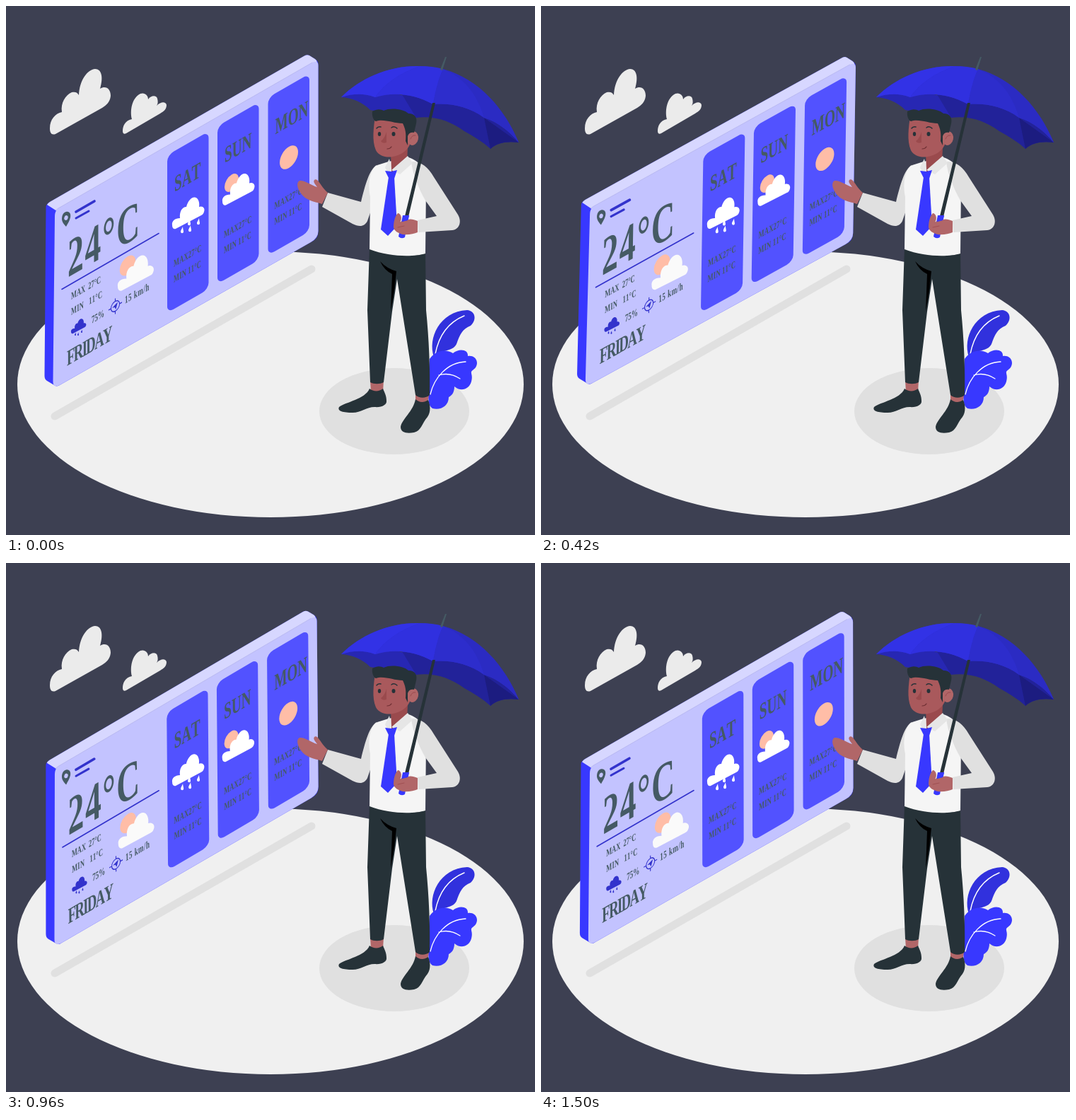
These frames come from a looping animation (748x748 px, 1.54 s). An HTML page with a canvas:

```html
<!DOCTYPE html>
<html lang="en">
<head>
<meta charset="utf-8">
<title>Weather panel</title>
<style>
  html, body { margin: 0; width: 100%; height: 100%; overflow: hidden; background: #3d4052; }
  canvas { display: block; width: 100vw; height: 100vh; }
</style>
</head>
<body>
<canvas id="stage" width="748" height="748"></canvas>
<script>
const ctx = document.getElementById('stage').getContext('2d');
const LOOP = 1540;
const SLOPE = -0.577;
const BLUE = '#3838ff', DEEP = '#3333cc', SLATE = '#455a64', DARK = '#263238';
const SKIN = '#b16668', SKIN_DARK = '#9a4a4d', PEACH = '#ffbda7', SLEEVE = '#e0e0e0';

function fill(path, color) {
  ctx.fillStyle = color;
  ctx.fill(new Path2D(path));
}

function stroke(path, color, width) {
  ctx.strokeStyle = color;
  ctx.lineWidth = width;
  ctx.stroke(new Path2D(path));
}

function ellipse(x, y, rx, ry, color, angle = 0) {
  ctx.fillStyle = color;
  ctx.beginPath();
  ctx.ellipse(x, y, rx, ry, angle, 0, Math.PI * 2);
  ctx.fill();
}

function at(x, y, scale, draw) {
  ctx.save();
  ctx.translate(x, y);
  ctx.scale(scale, scale);
  draw();
  ctx.restore();
}

// Runs draw in the slanted plane of the panel, with the origin at x, y.
function onPlane(x, y, widthScale, draw) {
  ctx.save();
  ctx.transform(widthScale, widthScale * SLOPE, 0, 1, x, y);
  draw();
  ctx.restore();
}

function label(text, x, y, size, spacing = 0) {
  onPlane(x, y, 0.6, () => {
    ctx.font = `bold ${size}px "Liberation Serif", serif`;
    ctx.fontKerning = 'none';
    ctx.letterSpacing = spacing + 'px';
    ctx.fillStyle = SLATE;
    ctx.fillText(text, 0, 0);
  });
}

const sun = (x, y, r) => onPlane(x, y, 0.866, () => ellipse(0, 0, r, r, PEACH));

function cloud(x, y, scale, color) {
  at(x, y, scale, () => fill('M0 40C-1 34 4 30 11 30C10 21 14 14 20 14C22 6 27 0 32 0.5C37 1 39 8 38 14C43 12 47 16 45 21C44 24 43 25 41 26L5 45C2 46 0 44 0 40Z', color));
}

function drop(x, y, scale, color) {
  at(x, y, scale, () => fill('M1-5C0-2-2 0-2 2C-2 5 2 5 2 2C2 0 1-2 1-5Z', color));
}

function card(name, x, y) {
  onPlane(x, y, 1, () => {
    ctx.fillStyle = '#5252ff';
    ctx.beginPath();
    ctx.roundRect(0, 0, 58.5, 223, 9);
    ctx.fill();
  });
  label(name, x + 10, y + 52, 32);
  label('MAX27°C', x + 9, y + 158, 14, 0.4);
  label('MIN 11°C', x + 9, y + 180, 14, 0.4);
}

function compass(x, y) {
  onPlane(x, y, 0.866, () => {
    ctx.strokeStyle = DEEP;
    ctx.lineWidth = 1.3;
    ctx.beginPath();
    ctx.arc(0, 0, 7, 0, Math.PI * 2);
    for (let i = 0; i < 4; i++) {
      const c = Math.cos(i * Math.PI / 2), s = Math.sin(i * Math.PI / 2);
      ctx.moveTo(c * 7, s * 7);
      ctx.lineTo(c * 10.5, s * 10.5);
    }
    ctx.stroke();
    fill('M4-4L1 5L-1 1L-5 0Z', DEEP);
  });
}

function panel() {
  fill('M56.5 285C56.5 281 59 279 62 277L421 71Q425 68 429 70L437 75Q442 78 441.5 84V318C441.5 327 437 331 431 334L76 536Q72 539 68 536L58 530Q54.5 528 54.5 523Z', BLUE);
  fill('M58 281Q59 279 62 277L421 71Q425 68 429 70L437 75Q440 77 440 80L72 290Z', '#d7d7ff');
  fill('M69 297Q69 290 74 286L433 80Q441.5 76 441.5 84V318Q441.5 328 431 334L76 536Q66 541 66.5 530Z', '#c3c3ff');
  stroke('M70 289L74 286L433 80', '#acace8', 0.6);

  fill('M85 291C90 290 92 294 91 299C90 304 87 308 85 312C82 309 79 305 79 301C79 296 81 292 85 291Z', SLATE);
  ellipse(85, 299.5, 2.6, 3.4, '#c3c3ff', 0.3);
  stroke('M99 291L125 276', DEEP, 3.6);
  stroke('M99 300L117 290', DEEP, 3);
  label('24°C', 87, 384, 76, 3);
  stroke('M79 400.5L216 321.5', DEEP, 1.6);
  sun(172, 367, 13);
  cloud(158, 352, 1.12, '#fafafa');
  label('MAX  27°C', 92, 415, 14);
  label('MIN   11°C', 92, 437, 14, 0.5);
  cloud(92, 442, 0.47, DEEP);
  for (const [x, y] of [[98, 464], [102, 464], [107, 460]]) drop(x, y, 0.5, DEEP);
  label('75%', 121, 449, 15);
  compass(154.5, 424.5);
  label('15 km/h', 168, 421, 15, 0.8);
  label('FRIDAY', 86, 509, 31, -2.6);

  card('SAT', 228, 211);
  card('SUN', 299, 170);
  card('MON', 370.5, 129.5);
  cloud(235, 270, 1, '#fff');
  for (const [x, y] of [[249, 317], [260, 315], [272, 305], [259, 306]]) drop(x, y, 1, '#fff');
  sun(319, 250, 11.5);
  cloud(306, 236.5, 1, '#fff');
  sun(400, 214, 15);
}

function ground() {
  ctx.fillStyle = '#3d4052';
  ctx.fillRect(0, 0, 748, 748);
  ellipse(374, 535, 358, 188, '#f0f0f0');
  stroke('M69 580L432 372', '#e0e0e0', 11);
  ellipse(549, 573, 106, 61, '#e0e0e0');
  fill('M62 173C62 160 70 152 79 150C77 137 84 126 93 122C98 121 101 122 103 126C104 105 115 90 126 89C135 89 138 100 133 117C141 112 148 117 148 127C147 136 142 140 136 144L70 181C64 183 62 179 62 173Z', '#ebebeb');
  fill('M165 177C165 170 168 162 178 160C175 148 178 130 190 124C196 122 201 126 201 132C205 126 213 126 214 131C215 135 215 138 213 141C219 135 226 135 227 140C227 146 223 149 218 152L170 180C167 182 165 180 165 177Z', '#ebebeb');
}

function plant() {
  fill('M605 496C596 470 613 432 652 430C664 431 666 444 657 452C645 457 642 464 637 478C631 490 614 485 605 496Z', '#3131dd');
  stroke('M607 492C612 466 626 447 648 438', '#fff', 1.4);
  fill('M599 499C608 486 623 485 632 491C640 484 654 485 653 495C666 493 671 508 660 515C655 518 661 521 658 531C655 542 643 546 634 538C634 547 630 551 626 553C626 566 614 572 603 569C597 565 598 558 597 552Z', BLUE);
  stroke('M600 549C605 527 623 504 650 503M612 522C622 519 633 521 642 527', '#fff', 1.3);
}

function umbrella() {
  fill('M474 129C490 130 504 136 515 147L580 158L604 139L522 115Z', '#2727b3');
  fill('M580 158C608 155 628 163 648 177C661 184 674 192 685 202C695 193 709 191 725 193C695 150 660 125 604 118L560 125Z', '#222299');
  fill('M676 158L685 202C695 193 709 191 725 193Z', '#1c1c80');
  fill('M474 129C501 102 541 84 585 85C649 86 701 135 725 193C711 176 695 164 676 158C654 142 628 137 604 139C577 124 548 121 522 129C505 123 490 124 474 129Z', '#2d2dcc');
  fill('M474 129C501 102 541 84 585 85C557 95 536 109 522 129C505 123 490 124 474 129Z', '#3232e6');
  fill('M585 85Q603 85 618 89C611 105 607 121 604 139C577 124 548 121 522 129C536 109 557 95 585 85Z', '#3030df');
  fill('M618 89C648 101 667 126 676 158C654 142 628 137 604 139C607 121 611 105 618 89Z', '#2d2dcc');
  fill('M618 89C670 104 705 145 725 193C711 176 695 164 676 158C667 126 648 101 618 89Z', '#2b2bc3');
  fill('M623 72L617 91L614 90L621 72Z', SLATE);
}

function legs() {
  fill('M515 529H534L533 546H516ZM579 550H598L596 562H579Z', SKIN);
  fill('M514 541C508 556 480 560 471 567C468 573 477 575 490 575C502 575 510 567 521 567C531 568 539 564 538 558C538 551 535 546 533 541C527 546 519 545 514 541Z', DARK);
  fill('M579 556C576 573 560 584 558 595C558 603 566 605 577 603C587 601 588 590 596 581C601 574 600 564 597 557C590 562 583 560 579 556Z', DARK);
  fill('M514 342L593 348L594 430C598 470 600 515 599 550C594 555 584 555 579 550L553 386L546 432L534 532C529 535 520 535 515 532L511 430Z', DARK);
  fill('M529 361Q538 371 552 375L549 403L544 432L546 379Q535 374 529 361Z', '#000');
}

function head() {
  fill('M544 205L568 200L567 222L545 235Z', SKIN_DARK);
  fill('M522 155C520 172 517 190 523 204C527 212 538 215 547 213C559 211 568 204 572 194L576 158Z', '#a9595c');
  ellipse(575, 187, 8, 10, SKIN, 0.2);
  stroke('M572 188Q574 182 579 183', SKIN_DARK, 1);
  fill('M518 149C525 145 530 146 534 148C544 143 563 146 569 152C578 152 582 158 580 166L577 179Q570 178 568 184V197L565 191C566 181 565 174 561 166C548 166 534 159 523 163C520 162 517 156 518 149Z', DARK);
  fill('M538 178Q535 188 530 191Q532 195 538 193Z', SKIN_DARK);
  ellipse(528, 181, 2.2, 3, DARK);
  ellipse(548, 181, 2.5, 3, DARK);
  stroke('M524 173Q526 170 530 171M545 172Q549 169 553 173', DARK, 1.5);
  stroke('M539 202Q543 202 545 199', '#6e2f33', 1.2);
}

function torso() {
  fill('M524 225C514 231 508 252 502 277L455 264L447 284L490 308C500 313 507 312 511 304L522 272Z', SLEEVE);
  fill('M541 220L569 214C585 219 595 232 594 255L593 350C577 355 542 355 514 344L515 270C511 249 515 230 525 225Z', '#f5f5f5');
  fill('M573 220C588 220 597 228 605 242L639 295C645 305 641 316 631 317L583 320L582 303L609 297L593 275C584 259 575 238 573 220Z', SLEEVE);
  head();
  fill('M542 216L536 228L540 237L545 232ZM568 212L575 222L557 238L545 232Z', '#e6e6e6');
  fill('M536 233L545 234L553 232L549 244L541 243Z', BLUE);
  fill('M541 242L549 242L553 311L540 325L530 316Z', BLUE);
  fill('M455 264C449 259 446 253 441 247C437 243 433 247 437 252L440 256C431 253 422 246 415 247C410 250 412 258 417 265C424 275 434 276 447 280Z', SKIN);
}

function grip() {
  fill('M607 137L603 137L564 297L569 298Z', DARK);
  fill('M561 296H570L564 327Q559 330 555 326Z', BLUE);
  fill('M582 304C576 302 572 300 567 303L557 306C561 300 558 293 554 293C550 297 548 305 548 313C549 318 554 321 561 323C569 324 577 322 582 320Z', SKIN);
  stroke('M557 306Q562 302 567 303M554 313L563 311', SKIN_DARK, 0.8);
  fill('M562 296H570L568 303L560 305Z', BLUE);
}

// Linear sway: up to +1 degree at a quarter, down to -1 at three quarters.
function swayAngle(phase) {
  const degrees = 1 - Math.abs(((phase + 0.25) % 1) * 4 - 2);
  return degrees * Math.PI / 180;
}

function frame(now) {
  const phase = (now % LOOP) / LOOP;
  ctx.lineCap = 'round';
  ground();
  ctx.save();
  ctx.translate(248, 303);
  ctx.rotate(swayAngle(phase));
  ctx.translate(-248, -303);
  panel();
  ctx.restore();
  plant();
  umbrella();
  legs();
  torso();
  grip();
}

const start = performance.now();
function tick() {
  frame(performance.now() - start);
  requestAnimationFrame(tick);
}
tick();
</script>
</body>
</html>
```
